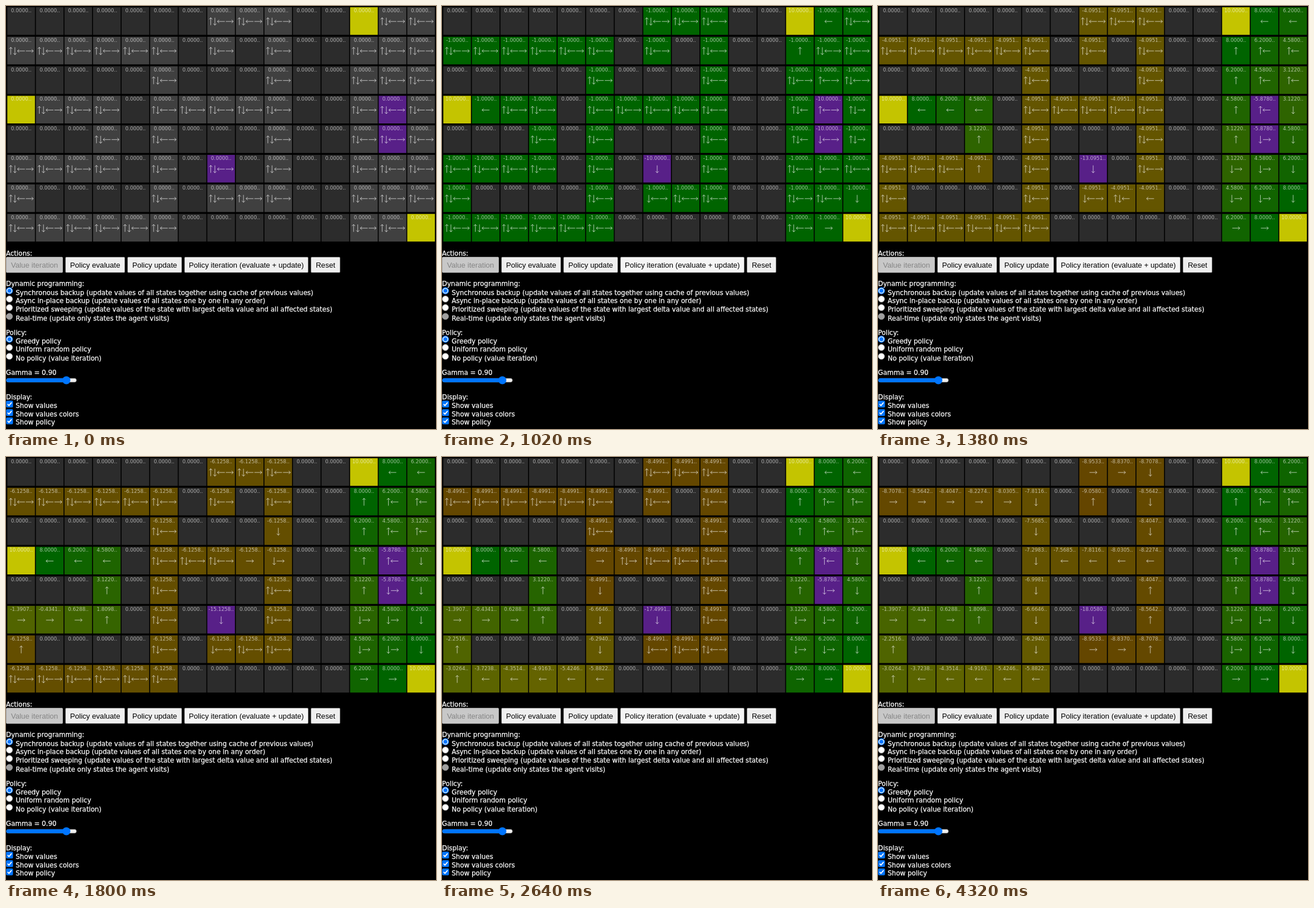
Recreate the animation shown at these times as an HTML page. Size 755 px wide and 742 px high, loop 5.34 s.

```html
<!DOCTYPE html>
<html lang="en">
<head>
<meta charset="utf-8">
<title>Policy iteration on a grid world</title>
<style>
  html, body { margin: 0; width: 100%; height: 100%; overflow: hidden; background: #000; }
  svg { display: block; }
  text { font: 11.6px "DejaVu Sans", Verdana, sans-serif; fill: #fff; }
  .line { stroke: #fff; stroke-width: .25; }
  .mid { text-anchor: middle; }
  .value { font-size: 8.7px; fill-opacity: .62; }
  .arrows { fill: none; stroke: #fff; stroke-opacity: .66; }
  .label { font: 13.1px "Liberation Sans", Arial, sans-serif; fill: #000; }
</style>
</head>
<body>
<svg id="stage" width="755" height="742" viewBox="0 0 755 742"></svg>
<script>
const LOOP = 5340, TICK = 60, FIRST_SWEEP = 978, SWEEP = 96, SWEEPS = 30;
const GAMMA = 0.9, BLUE = '#0075ff';
// '#' wall, '.' free, 'T' goal, 'P' penalty
const MAP = [
  '#######...##T..',
  '......#.#.##...',
  '#####.###.##...',
  'T...#.....##.P.',
  '###.#.###.##.P.',
  '....#.#P#.##...',
  '.####.#...##...',
  '......######..T'
];
const COLS = MAP[0].length;
const kinds = [...MAP.join('')];
const REWARD = { '.': -1, P: -10, T: 10 };
const FILL = { '#': '#2c2c2c', T: '#c4c400', P: '#582088' };
const MOVES = [[-1, 0], [1, 0], [0, -1], [0, 1]];
const acts = k => k === '.' || k === 'P';

const stage = document.getElementById('stage');
function add(tag, attrs, text = '') {
  const el = document.createElementNS('http://www.w3.org/2000/svg', tag);
  for (const key in attrs) el.setAttribute(key, attrs[key]);
  el.textContent = text;
  return stage.appendChild(el);
}

// ---- Policy iteration ----
function neighbour(s, [dr, dc]) {
  const r = Math.floor(s / COLS) + dr, c = s % COLS + dc;
  const kind = MAP[r]?.[c];
  return kind && kind !== '#' ? r * COLS + c : s;
}

function evaluate({ values, policy }) {
  return values.map((v, s) => {
    const kind = kinds[s];
    if (kind === '#') return 0;
    if (kind === 'T') return REWARD.T;
    const p = 1 / policy[s].length;
    let sum = 0;
    for (const m of policy[s]) sum += p * (REWARD[kind] + GAMMA * values[neighbour(s, m)]);
    return sum;
  });
}

// Exact comparison: rounding differences decide ties.
function greedy(values) {
  return kinds.map((kind, s) => {
    if (!acts(kind)) return [];
    const next = MOVES.map(m => values[neighbour(s, m)]);
    const best = Math.max(...next);
    return MOVES.filter((m, i) => next[i] === best);
  });
}

const zeros = kinds.map(() => 0);
const states = [{ values: zeros, policy: greedy(zeros) }];
for (let i = 0; i < SWEEPS; i++) {
  const values = evaluate(states[i]);
  states.push({ values, policy: greedy(values) });
}

// ---- Grid ----
const cells = kinds.map((kind, s) => {
  const x = 2.3 + 50.16 * (s % COLS), y = 2.1 + 51.8 * Math.floor(s / COLS);
  const mid = x + 24.4;
  return {
    box: add('rect', { x, y, width: 48.5, height: 48.5 }),
    value: add('text', { x: mid, y: y + 8.8, class: 'mid value' }),
    arrows: add('path', { transform: `translate(${mid} ${y + 25})`, class: 'arrows' })
  };
});

// Arrows side by side, centred on the origin; upright ones take half the room.
function arrowPath(moves) {
  const room = ([dr]) => dr ? 7.33 : 14.67;
  let x = -moves.reduce((sum, m) => sum + room(m), 0) / 2;
  return moves.map(m => {
    const [dr, dc] = m, cx = x + room(m) / 2;
    x += room(m);
    const at = (along, side) => `${cx + dc * along + dr * side} ${dr * along + dc * side}`;
    return `M${at(-6.5, 0)}L${at(6.5, 0)}M${at(3.7, -2.8)}L${at(6.5, 0)}L${at(3.7, 2.8)}`;
  }).join('');
}

function shade(v, low, high) {
  if (low === high) return '#404040';
  const q = (2 * v - low - high) / (high - low);
  const part = k => Math.round(100 * Math.min(1, k));
  return `rgb(${part(1 - q)},${part(1 + q)},0)`;
}

function showGrid({ values, policy }) {
  const range = values.filter((v, s) => acts(kinds[s]));
  const low = Math.min(...range), high = Math.max(...range);
  cells.forEach((cell, s) => {
    cell.box.setAttribute('fill', FILL[kinds[s]] || shade(values[s], low, high));
    cell.value.textContent = values[s].toFixed(4) + '..';
    cell.arrows.setAttribute('d', arrowPath(policy[s]));
  });
}

// ---- Controls ----
const line = (x, y, text) => add('text', { x, y, class: 'line' }, text);

function button(x, width, text, disabled) {
  const box = add('rect', {
    x: x + .5, y: 440.5, width: width - 1, height: 27, rx: 1.5,
    fill: disabled ? '#c8c8c8' : '#efefef', stroke: disabled ? '#a0a0a0' : '#767676'
  });
  const label = add('text', { x: x + width / 2, y: 458.5, class: 'mid label' }, text);
  if (disabled) label.style.fill = '#858585';
  return box;
}

function radio(y, text, mode) {
  const on = mode === 'on', off = mode === 'disabled';
  add('circle', {
    cx: 6, cy: y - 7, r: 5.5, 'stroke-width': on ? 1.3 : .9,
    fill: off ? '#a0a0a0' : '#fff', stroke: on ? BLUE : '#8c8c8c'
  });
  if (on) add('circle', { cx: 6, cy: y - 7, r: 3.5, fill: BLUE });
  line(17, y, text);
}

function checkbox(y, text) {
  add('rect', { x: .3, y: y - 12.3, width: 12, height: 12, rx: 2, fill: BLUE });
  add('path', { d: `M2.8 ${y - 6.2}l2.4 2.5 4.7-5.4`, fill: 'none', stroke: '#fff', 'stroke-width': 1.8 });
  line(17, y, text);
}

line(0, 438, 'Actions:');
button(0, 100, 'Value iteration', true);
button(104, 105, 'Policy evaluate');
button(213, 96, 'Policy update');
const iterate = button(313, 218, 'Policy iteration (evaluate + update)');
button(535, 52, 'Reset');

line(0, 491, 'Dynamic programming:');
radio(506.5, 'Synchronous backup (update values of all states together using cache of previous values)', 'on');
radio(521, 'Async in-place backup (update values of all states one by one in any order)');
radio(536, 'Prioritized sweeping (update values of the state with largest delta value and all affected states)');
radio(551.5, 'Real-time (update only states the agent visits)', 'disabled');

line(0, 576.5, 'Policy:');
radio(591.5, 'Greedy policy', 'on');
radio(606, 'Uniform random policy');
radio(621.5, 'No policy (value iteration)');

line(0, 646.5, 'Gamma = 0.90');
add('rect', { x: 1, y: 653.3, width: 122.5, height: 6.4, rx: 3.2, fill: '#efefef', stroke: '#b2b2b2', 'stroke-width': .8 });
add('rect', { x: .5, y: 652.9, width: 107, height: 7.2, rx: 3.6, fill: BLUE });
add('circle', { cx: 106, cy: 656.5, r: 7, fill: BLUE });

line(0, 689.5, 'Display:');
checkbox(704.5, 'Show values');
checkbox(719.5, 'Show values colors');
checkbox(734, 'Show policy');

// ---- Playback: start, then fill and border of the pressed button ----
const IDLE = ['#efefef', '#767676'], HOVER = ['#e5e5e5', '#4f4f4f'], ACTIVE = ['#f5f5f5', '#8d8d8d'];
const LOOKS = [[0, IDLE], [540, HOVER], [600, ACTIVE], [720, HOVER], [1020, ACTIVE], [4260, HOVER], [4320, IDLE]];

let shown = -1;
function frame() {
  const t = Math.floor(performance.now() % LOOP / TICK) * TICK;
  const n = Math.max(0, Math.min(SWEEPS, 1 + Math.floor((t - FIRST_SWEEP) / SWEEP)));
  if (n !== shown) showGrid(states[shown = n]);
  const [fill, stroke] = LOOKS.findLast(([start]) => t >= start)[1];
  iterate.setAttribute('fill', fill);
  iterate.setAttribute('stroke', stroke);
  requestAnimationFrame(frame);
}
frame();
</script>
</body>
</html>
```
